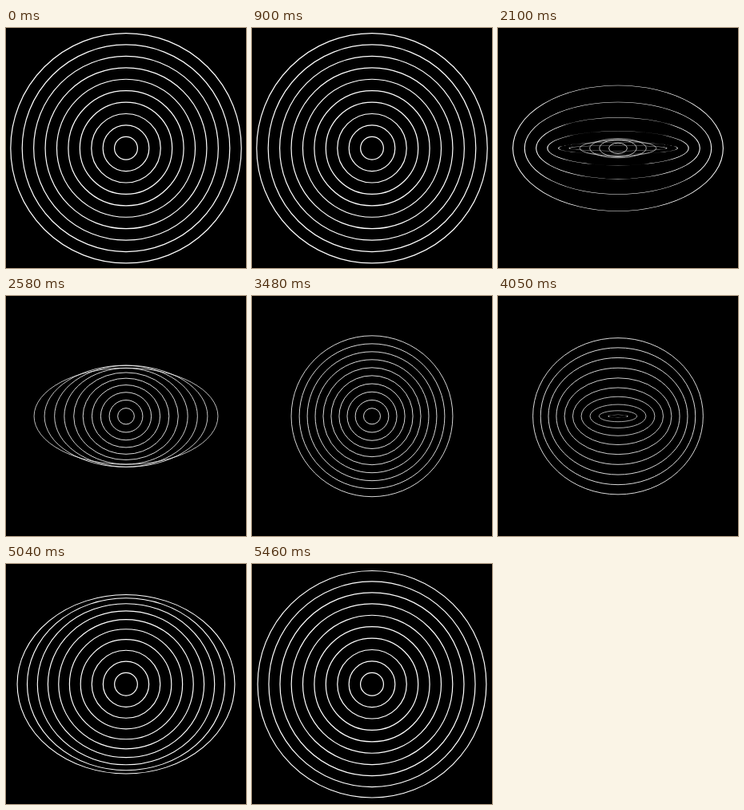
Write an HTML page that moves like this. It is 300x301 px and loops after 5.49 s.

```html
<!DOCTYPE html>
<html lang="en">
<head>
<meta charset="utf-8">
<title>Flipping rings</title>
<style>
  html, body { margin: 0; width: 100%; height: 100%; overflow: hidden; background: #000; }
  svg { display: block; width: 100vw; height: 100vh; }
  circle { fill: none; stroke: #fff; stroke-width: 1.2; }
</style>
</head>
<body>
<svg viewBox="0 0 300 301"></svg>
<script>
const LOOP = 5490;
const FLIP = 2250;       // duration of one half turn
const FIRST_START = 732; // when the innermost ring sets off
const STAGGER = 56;
const RING_COUNT = 10;
const SPACING = 14.42;
const MIN_SCALE = 0.7;

const svg = document.querySelector('svg');
const rings = Array.from({ length: RING_COUNT }, (_, i) => {
  const ring = document.createElementNS(svg.namespaceURI, 'circle');
  ring.setAttribute('r', SPACING * (i + 1));
  return svg.appendChild(ring);
});

const easeInOut = t => t < 0.5 ? 2 * t * t : 1 - 2 * (1 - t) ** 2;

// Half turn while shrinking, then another half turn while growing back.
function pose(time) {
  const t = Math.min(Math.max(time / FLIP, 0), 2);
  const growing = t > 1;
  const p = easeInOut(growing ? t - 1 : t);
  const scale = 1 - (1 - MIN_SCALE) * (growing ? 1 - p : p);
  return [scale, scale * Math.abs(Math.cos(Math.PI * p))];
}

function draw(time) {
  rings.forEach((ring, i) => {
    const [sx, sy] = pose(time - FIRST_START - i * STAGGER);
    ring.setAttribute('transform', `translate(150 150.75) scale(${sx} ${Math.max(sy, 0.001)})`);
  });
}

const start = performance.now();
function tick(now) {
  draw(Math.max(now - start, 0) % LOOP);
  requestAnimationFrame(tick);
}
draw(0);
requestAnimationFrame(tick);
</script>
</body>
</html>
```
